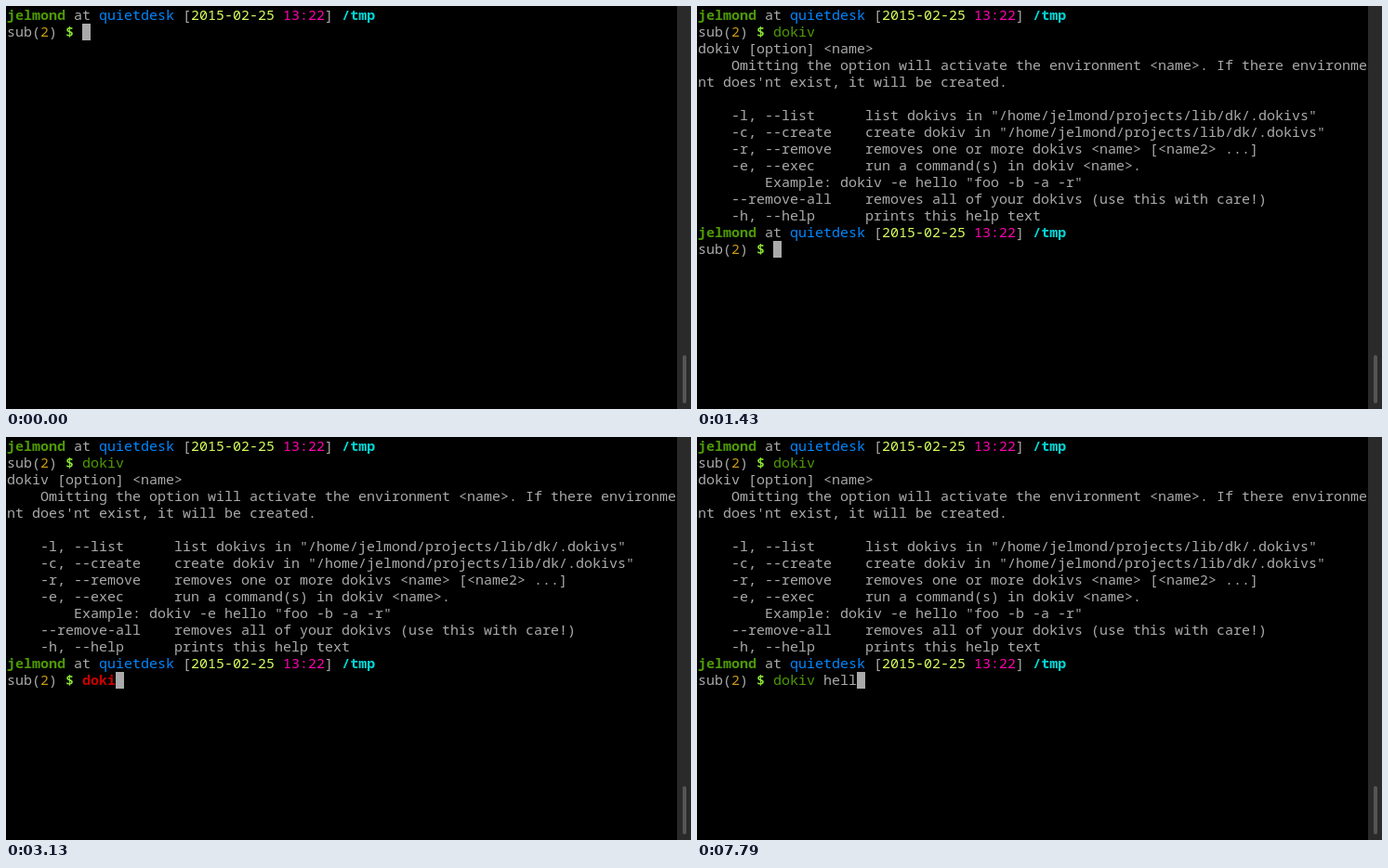
Write an HTML page that moves like this. It is 737 by 434 pixels and loops after 8000 ms.

```html
<!DOCTYPE html>
<html lang="en">
<head>
<meta charset="utf-8">
<title>Terminal session</title>
<style>
  html, body { margin: 0; width: 100%; height: 100%; overflow: hidden; background: #000; }
  #stage { position: relative; width: 737px; height: 434px; overflow: hidden; background: #000; }
  .row {
    position: absolute; left: 1px; height: 18px; margin: 0;
    font: 15px/18px "Noto Sans Mono", "DejaVu Sans Mono", monospace;
    font-variant-ligatures: none; white-space: pre; color: #aaa;
  }
  .user { color: #4e9a06; font-weight: bold; }
  .host { color: #0087ff; }
  .date { color: #d7ff5f; }
  .time { color: #ff00af; }
  .dir { color: #00d7d7; font-weight: bold; }
  .level { color: #c99a10; }
  .sign { color: #8ae234; font-weight: bold; }
  .cmd { color: #4e9a06; }
  .bad { color: #c00; font-weight: bold; }
  .path {
    color: #c4a000; text-decoration: underline 1px;
    text-underline-offset: 1px; text-decoration-skip-ink: none;
  }
  #cursor { position: absolute; width: 9px; height: 18px; background: #aaa; }
  #bar { position: absolute; left: 722px; top: 0; width: 15px; height: 434px; background: #2a2a2a; }
  #thumb { position: absolute; left: 6px; top: 376px; width: 4px; height: 52px; border-radius: 2px; background: #555; }
</style>
</head>
<body>
<div id="stage">
  <div id="screen"></div>
  <div id="cursor"></div>
  <div id="bar"><div id="thumb"></div></div>
</div>
<script>
const LOOP = 8000, CELL = 9, LINE = 18, PROMPT_COLS = 9;
const screenEl = document.getElementById('screen');
const cursor = document.getElementById('cursor');

const span = (kind, text) => `<span class="${kind}">${text}</span>`;
const escape = s => s.replace(/</g, '&lt;').replace(/>/g, '&gt;');

const header = `${span('user', 'jelmond')} at ${span('host', 'quietdesk')} ` +
  `[${span('date', '2015-02-25')} ${span('time', '13:22')}] ${span('dir', '/tmp')}`;
const prompt = `sub(${span('level', '2')}) ${span('sign', '$')} `;

const help = `dokiv [option] <name>
    Omitting the option will activate the environment <name>. If there environme
nt does'nt exist, it will be created.

    -l, --list      list dokivs in "/home/jelmond/projects/lib/dk/.dokivs"
    -c, --create    create dokiv in "/home/jelmond/projects/lib/dk/.dokivs"
    -r, --remove    removes one or more dokivs <name> [<name2> ...]
    -e, --exec      run a command(s) in dokiv <name>.
        Example: dokiv -e hello "foo -b -a -r"
    --remove-all    removes all of your dokivs (use this with care!)
    -h, --help      prints this help text`.split('\n').map(escape);

const cmd = span('cmd', 'dokiv');
const history = [header, prompt + cmd, ...help];

// start time, help printed, typed markup, typed length
const steps = [
  [0, false, '', 0],
  [500, false, span('cmd', 'do'), 2],
  [690, false, span('bad', 'doki'), 4],
  [840, false, cmd, 5],
  [1430, true, '', 0],
  [2920, true, span('cmd', 'do'), 2],
  [3130, true, span('bad', 'doki'), 4],
  [3340, true, cmd + ' ', 6],
  [7520, true, cmd + ' ' + span('path', 'he'), 8],
  [7790, true, cmd + ' hell', 10]
];

function show([, printed, typed, length]) {
  const rows = [...(printed ? history : []), header, prompt + typed];
  screenEl.innerHTML = rows
    .map((row, i) => `<div class="row" style="top:${i * LINE}px">${row}</div>`)
    .join('');
  cursor.style.left = 1 + (PROMPT_COLS + length) * CELL + 'px';
  cursor.style.top = 1 + (rows.length - 1) * LINE + 'px';
}

let start = null, current = null;
function tick(now) {
  if (start === null) start = now;
  const t = (now - start) % LOOP;
  const step = steps.findLast(s => s[0] <= t) || steps[0];
  if (step !== current) show(current = step);
  requestAnimationFrame(tick);
}
show(current = steps[0]);
requestAnimationFrame(tick);
</script>
</body>
</html>
```
